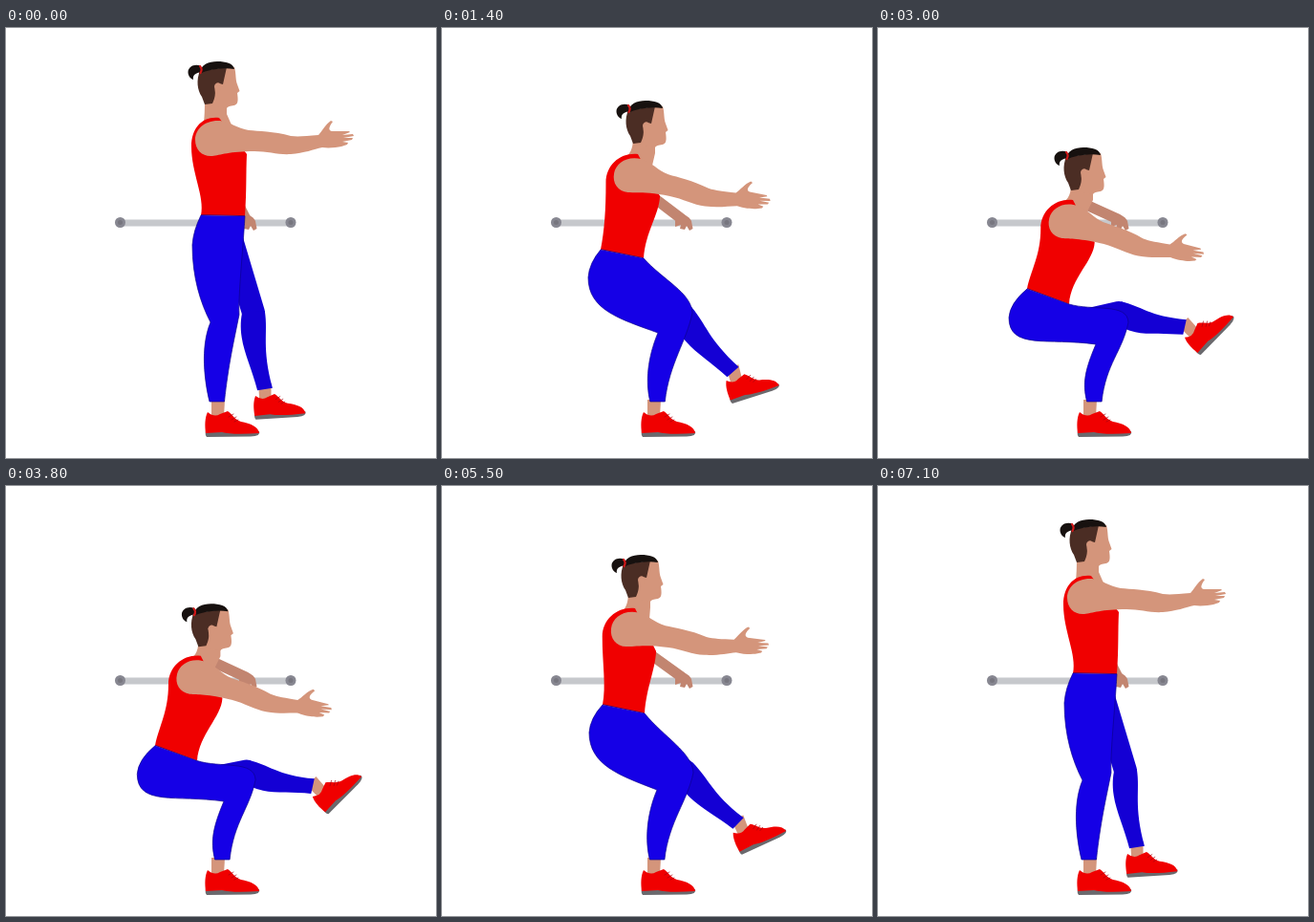
An HTML page with a canvas for the animation above (7200 ms loop, 450 by 450 pixels).

```html
<!DOCTYPE html>
<html lang="en">
<head>
<meta charset="utf-8">
<title>Single-leg squat</title>
<style>
  html, body { margin: 0; height: 100%; overflow: hidden; background: #fff; }
  canvas { display: block; }
</style>
</head>
<body>
<canvas id="stage" width="450" height="450"></canvas>
<script>
const ctx = document.getElementById('stage').getContext('2d');
const LOOP = 7200, STEP = 100;
const SKIN = '#d4957b', SHADED = '#c28570', RED = '#f00000', BLUE = '#1500e6', DEEP = '#1400d4';

// Six poses: standing, descending, low, lowest, rising, nearly up.
const times = [200, 1400, 2200, 3000, 3400, 4500, 5500, 6700];
const order = [0, 1, 2, 3, 3, 4, 5, 0];
const tracks = {
  head: [[0, 0], [-8, 41], [-4, 79], [-6, 90], [-9, 79], [-13, 37]],
  shoulder: [[214, 116], [196, 154], [195, 189], [195, 202], [194, 189], [193, 150]],
  arm: [[0], [11.5], [16], [14.5], [14], [7.5]],
  waistBack: [[204, 196], [166, 232], [157, 264], [156, 273], [156, 265], [168, 229]],
  waistFront: [[250, 197], [211, 241], [201, 280], [200, 289], [200, 280], [212, 238]],
  seat: [[195, 227], [153, 261], [139, 295], [137, 303], [139, 293], [154, 258]],
  kneeBack: [[214, 308], [226, 319], [228, 327], [228, 331], [228, 326], [225, 318]],
  kneeFront: [[244, 300], [262, 298], [258, 305], [262, 308], [259, 305], [263, 300]],
  farKnee: [[259, 298], [252, 300], [250, 300], [252, 298], [251, 300], [254, 298]],
  farAnkle: [[271, 378], [304.5, 360], [319, 330], [321, 313], [321, 320], [310, 353]],
  foot: [[-3], [-17], [-35], [-45], [-41], [-24]]
};

// Smooth interpolation that never overshoots a key.
function sample(values, t) {
  const last = times.length - 1;
  if (t <= times[0]) return values[0];
  if (t >= times[last]) return values[last];
  const slope = i => (values[i + 1] - values[i]) / (times[i + 1] - times[i]);
  const tangent = i => {
    if (i === 0 || i === last) return 0;
    const a = slope(i - 1), b = slope(i);
    return a * b > 0 ? 2 * a * b / (a + b) : 0;
  };
  const i = times.findIndex(k => k > t) - 1;
  const span = times[i + 1] - times[i], u = (t - times[i]) / span, v = 1 - u;
  return v * v * (1 + 2 * u) * values[i] + u * u * (3 - 2 * u) * values[i + 1]
    + span * u * v * (v * tangent(i) - u * tangent(i + 1));
}

function poseAt(t) {
  const pose = {};
  for (const [name, keys] of Object.entries(tracks))
    pose[name] = keys[0].map((_, axis) => sample(order.map(k => keys[k][axis]), t));
  return pose;
}

const off = (p, dx, dy) => [p[0] + dx, p[1] + dy];
const mix = (a, b, fx, fy = fx) => [a[0] + (b[0] - a[0]) * fx, a[1] + (b[1] - a[1]) * fy];

function fill(color, d, edge) {
  const path = new Path2D(d);
  ctx.fillStyle = color;
  ctx.fill(path);
  if (edge) {
    ctx.strokeStyle = edge;
    ctx.lineWidth = 0.7;
    ctx.stroke(path);
  }
}

function line(color, width, d) {
  ctx.strokeStyle = color;
  ctx.lineWidth = width;
  ctx.stroke(new Path2D(d));
}

function dot(color, x, y, r) {
  ctx.fillStyle = color;
  ctx.beginPath();
  ctx.arc(x, y, r, 0, 7);
  ctx.fill();
}

function placed([x, y], degrees, scale, draw) {
  ctx.save();
  ctx.translate(x, y);
  ctx.rotate(degrees * Math.PI / 180);
  ctx.scale(scale, scale);
  draw();
  ctx.restore();
}

function drawBar() {
  line('#c6c8cc', 7, 'M119 204H298');
  for (const x of [119.5, 298]) {
    dot('#878791', x, 203.5, 5.5);
    dot('#77767f', x, 203.5, 2.5);
  }
}

function drawShoe() {
  fill(SKIN, 'M-7 -2H7L6 16H-7Z');
  fill('#6a696d', 'M-13 30L43 31Q45 36 34 36.5L-12 37Q-14 35 -13 30Z');
  fill(RED, 'M-11 11Q-4 17 2 13L10 10C15 13 17 19 24 21C34 23 42 26 43 33Q15 35 4 32L-13 33C-14 25 -14 17 -11 11Z');
  line('#a80010', 0.7, 'M11 16L16 13M14 19L19 16M17 21L21 19');
}

function drawFarArm({ shoulder }) {
  const elbow = off(shoulder, 19, (178 - shoulder[1]) * 0.78);
  line(SHADED, 11, `M${shoulder}L${elbow}L251 200`);
  fill(SHADED, 'M244 198C252 193 259 197 261 202L262.5 210L259 212L256 207L254 211L249 210L250 206L244 208Z');
}

function drawFarLeg({ waistFront, farKnee, farAnkle, foot }) {
  placed(off(farAnkle, 0, -4), foot[0], 0.95, drawShoe);
  line(DEEP, 24, `M${off(waistFront, -14, 24)}L${farKnee}`);
  const dx = farAnkle[0] - farKnee[0], dy = farAnkle[1] - farKnee[1], len = Math.hypot(dx, dy);
  placed(farKnee, Math.atan2(dy, dx) * 180 / Math.PI, 1, () =>
    fill(DEEP, `M0 -12C${len * .3} -12 ${len * .45} -3 ${len} -8V8
      C${len * .75} 10 ${len * .5} 16 ${len * .3} 16C12 16 4 14 -4 11Z`));
}

function drawNearLeg({ waistBack, waistFront, seat, kneeBack, kneeFront }) {
  const ankle = [213 + (kneeBack[0] - 214) * 0.4, 391];
  placed([222, 391], 0, 1, drawShoe);
  fill(BLUE, `M${waistBack}Q${off(seat, 1, -15)} ${seat}
    C${off(seat, 0, 34)} ${mix(kneeBack, seat, .55, .25)} ${kneeBack}
    C${off(kneeBack, -11, 26)} ${off(ankle, -5, -20)} ${ankle}
    h15.5C${off(ankle, 20, -40)} ${off(kneeFront, -6, 30)} ${kneeFront}
    C${off(kneeFront, -1, -21)} ${mix(waistFront, kneeFront, .4)} ${waistFront}Z`, '#0e0090');
}

function drawNeck({ head, shoulder }) {
  fill(SKIN, `M${off(head, 208, 74)}L${off(head, 231, 78)}L${off(head, 231, 90)}
    L${off(shoulder, 24, -10)}L${off(shoulder, 8, 4)}L${off(shoulder, -7, -18)}
    Q${off(head, 208, 92)} ${off(head, 208, 74)}Z`);
}

function drawTorso({ shoulder, waistBack, waistFront }) {
  const back = off(shoulder, mix([-20, 0], [-25, 0], (214 - shoulder[0]) / 20)[0], 8);
  const chest = off(shoulder, 38 - (214 - shoulder[0]) * 0.33, 16 + (214 - shoulder[0]) * 0.33);
  fill(RED, `M${off(shoulder, 9, -22)}C${off(shoulder, -8, -24)} ${off(back, 0, -20)} ${back}
    C${off(back, 0, 28)} ${off(waistBack, 4, -20)} ${waistBack}
    L${waistFront}C${off(waistFront, 2, -28)} ${off(chest, -1, 20)} ${chest}Z`);
}

function drawNearArm({ shoulder, arm }) {
  placed(shoulder, arm[0], 1, () => fill(SKIN,
    `M10 -19C-6 -20 -16 -10 -16 1C-16 12 -8 19 2 18C10 17 20 13 46 13C60 13 72 17 84 16
     C98 15 108 11 117 9C124 10 132 9 137 8L143 6L144 4L138 3L148 1L149 -1L139 -1L150 -3L149 -5
     L138 -4L146 -7L145 -8L127 -8C122 -9 125 -14 128 -18L126 -19C120 -15 117 -8 113 -4
     C100 -3 92 -2 84 -3C66 -8 50 -8 40 -9C28 -11 20 -18 10 -19Z`));
}

function drawHead({ head }) {
  placed(head, 0, 1, () => {
    fill(SKIN, 'M228 41L239 41C241 48 240 54 242 59L244.5 66L242 68C243 75 243 79 240 80.5C236 82 233 81 231 84L216 82L217 56Z');
    fill('#4b2d24', 'M203 45C199 54 200 65 205 72L208 80L216 79C219 73 219 69 219 62L223 58L227 59L231 41Z');
    fill(SKIN, 'M218 61C219 56 225 56 225 61C225 66 221 70 219 68Z');
    fill('#17110f', 'M202 48C204 38 212 35 221 35C230 35 238 37 239 43C227 41 213 43 202 48Z');
    fill('#17110f', 'M204 40C198 37 191 40 190.5 46C190.5 50 193 53 196 54C195 49 199 47 204 46Z');
    line('#d01818', 2.2, 'M203 40Q206 43 203.5 47');
  });
}

function frame(now) {
  const t = Math.floor(now % LOOP / STEP) * STEP;
  const pose = poseAt(t);
  ctx.fillStyle = '#fff';
  ctx.fillRect(0, 0, 450, 450);
  ctx.lineCap = ctx.lineJoin = 'round';
  [drawBar, drawFarArm, drawFarLeg, drawNeck, drawTorso, drawNearLeg, drawNearArm, drawHead]
    .forEach(draw => draw(pose));
  requestAnimationFrame(() => frame(performance.now() - start));
}

const start = performance.now();
frame(0);
</script>
</body>
</html>
```
